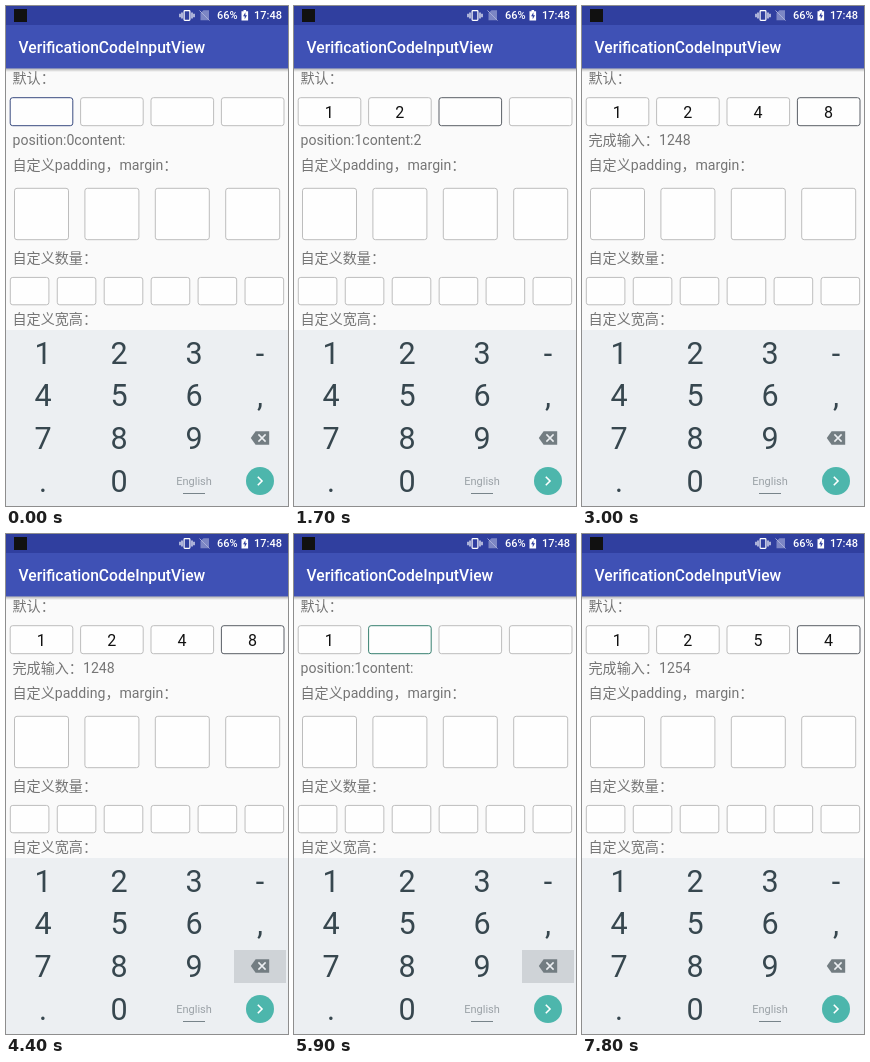
An HTML page for the animation above (8000 ms loop, 282 by 500 pixels).

```html
<!DOCTYPE html>
<html lang="zh-CN">
<head>
<meta charset="utf-8">
<style>
html, body { margin: 0; width: 100%; height: 100%; overflow: hidden; background: #fafafa; }
svg { display: block; width: 100vw; height: 100vh; font-family: Roboto, "Noto Sans CJK SC", "Noto Sans CJK", sans-serif; }
.label { font-size: 14.1px; fill: #757575; }
.code { font-size: 16px; fill: #111; text-anchor: middle; }
.key { font-size: 30.5px; fill: #37474f; text-anchor: middle; }
.status { font-size: 11px; font-weight: 500; fill: #fff; }
</style>
</head>
<body>
<svg id="stage" viewBox="0 0 282 500">
  <defs>
    <linearGradient id="shade" x2="0" y2="1">
      <stop stop-color="#000" stop-opacity=".28"/>
      <stop offset="1" stop-color="#000" stop-opacity="0"/>
    </linearGradient>
  </defs>
  <rect width="282" height="500" fill="#fafafa"/>
  <rect width="282" height="19" fill="#303f9f"/>
  <rect y="19" width="282" height="43.5" fill="#3f51b5"/>
  <rect y="62.5" width="282" height="3.5" fill="url(#shade)"/>
  <rect x="8" y="3" width="13" height="13" fill="#111"/>

  <g fill="none" stroke="#fff" stroke-width="1.2">
    <rect x="178.1" y="4.6" width="5.8" height="9.8" rx=".8"/>
    <path d="M176 6.5v6M174 7.8v3.4M186 6.5v6M188 7.8v3.4"/>
  </g>
  <path d="M194.5 7l3-2.8h5.5v10h-8.5z" fill="#7c86c4"/>
  <path d="M193.5 4.5l10 10" stroke="#a5acd8"/>
  <text class="status" x="211" y="13.3">66%</text>
  <path d="M235.5 5.2h2v-1.2h2.6v1.2h2v9.2h-6.6z" fill="#fff"/>
  <path d="M239.4 6.3l-2.3 4h1.6v3l2.3-4h-1.6z" fill="#303f9f"/>
  <text class="status" x="248" y="13.3">17:48</text>
  <text x="12.5" y="46.7" font-size="15.67" font-weight="500" fill="#fff">VerificationCodeInputView</text>

  <g class="label">
    <text x="6.5" y="77.3">默认：</text>
    <text id="info" x="6.5" y="138.6"></text>
    <text x="6.5" y="163.8">自定义padding，margin：</text>
    <text x="6.5" y="256.8">自定义数量：</text>
    <text x="6.5" y="317.8">自定义宽高：</text>
  </g>
  <g id="boxes" fill="#fefefe" stroke="#bdbdbd"></g>
  <g id="digits" class="code"></g>

  <rect y="324" width="282" height="176" fill="#eceff2"/>
  <rect id="press" height="33" fill="#cfd3d7"/>
  <g id="keys" class="key"></g>
  <path d="M244.8 432l4.8-6.8h13.6v13.6h-13.6z" fill="#737d82"/>
  <path d="M252.4 428.4l7.2 7.2m0-7.2l-7.2 7.2" stroke="#eceff2" stroke-width="1.5"/>
  <text x="188" y="479" font-size="11" text-anchor="middle" fill="#9ba2a7">English</text>
  <path d="M177 487.5h22" stroke="#78848a"/>
  <circle cx="254" cy="475" r="14" fill="#4db6ac"/>
  <path d="M251.8 470.8l4.2 4.2-4.2 4.2" fill="none" stroke="#fff" stroke-width="1.6"/>
</svg>
<script>
const $ = id => document.getElementById(id);
const LOOP = 8000, DEL = '<';

// press time, release time, key
const taps = [
  [500, 700, '1'], [1400, 1600, '2'], [2100, 2300, '4'], [2800, 3000, '8'],
  [4400, 4600, DEL], [4900, 5100, DEL], [5400, 5600, DEL], [5900, 6100, DEL],
  [6300, 6600, '1'], [6900, 7100, '2'], [7300, 7400, '5'], [7700, 7800, '4']
];

function add(parent, tag, attrs, text = '') {
  const el = document.createElementNS('http://www.w3.org/2000/svg', tag);
  for (const k in attrs) el.setAttribute(k, attrs[k]);
  el.textContent = text;
  return $(parent).appendChild(el);
}

function row(count, x, y, step, width, height) {
  return Array.from({ length: count }, (_, i) =>
    add('boxes', 'rect', { x: x + i * step, y, width, height, rx: 2.5 }));
}

const inputs = row(4, 4.2, 91.7, 70.4, 62.6, 28);
row(4, 8.5, 182.3, 70.4, 54, 51.4);
row(6, 4.3, 271.4, 46.95, 38.6, 27.4);

const digits = inputs.map((_, i) => add('digits', 'text', { x: 35.3 + i * 70.4, y: 112 }));

['123-', '456,', '789', '.0'].forEach((line, r) =>
  [...line].forEach((ch, c) =>
    add('keys', 'text', { x: [37, 113, 188, 254][c], y: 357.6 + r * 42.8 }, ch)));

function focusColor(t) {
  if (t < 700) return '#3a4c80';
  return t >= 5600 && t < 7100 ? '#388070' : '#5a5f66';
}

function showPress(key) {
  const press = $('press');
  press.style.display = key ? '' : 'none';
  if (!key) return;
  const del = key === DEL, n = key - 1;
  press.setAttribute('x', del ? 228 : 2.5 + (n % 3) * 75.3);
  press.setAttribute('y', del ? 416 : 330 + Math.floor(n / 3) * 43);
  press.setAttribute('width', del ? 52 : 70);
}

function draw(t) {
  let code = '', info = 'position:0content:', held = '';
  for (const [down, up, key] of taps) {
    if (t < down) break;
    if (t < up) { held = key; break; }
    if (key === DEL) {
      code = code.slice(0, -1);
      info = `position:${code.length}content:`;
    } else {
      code += key;
      info = code.length === 4 ? '完成输入：' + code : `position:${code.length - 1}content:${key}`;
    }
  }
  const focus = Math.min(code.length, 3);
  inputs.forEach((box, i) => {
    box.setAttribute('stroke', i === focus ? focusColor(t) : '#bdbdbd');
    digits[i].textContent = code[i] || '';
  });
  $('info').textContent = info;
  showPress(held);
}

const start = performance.now();
function tick() {
  draw((performance.now() - start) % LOOP);
  requestAnimationFrame(tick);
}
tick();
</script>
</body>
</html>
```
